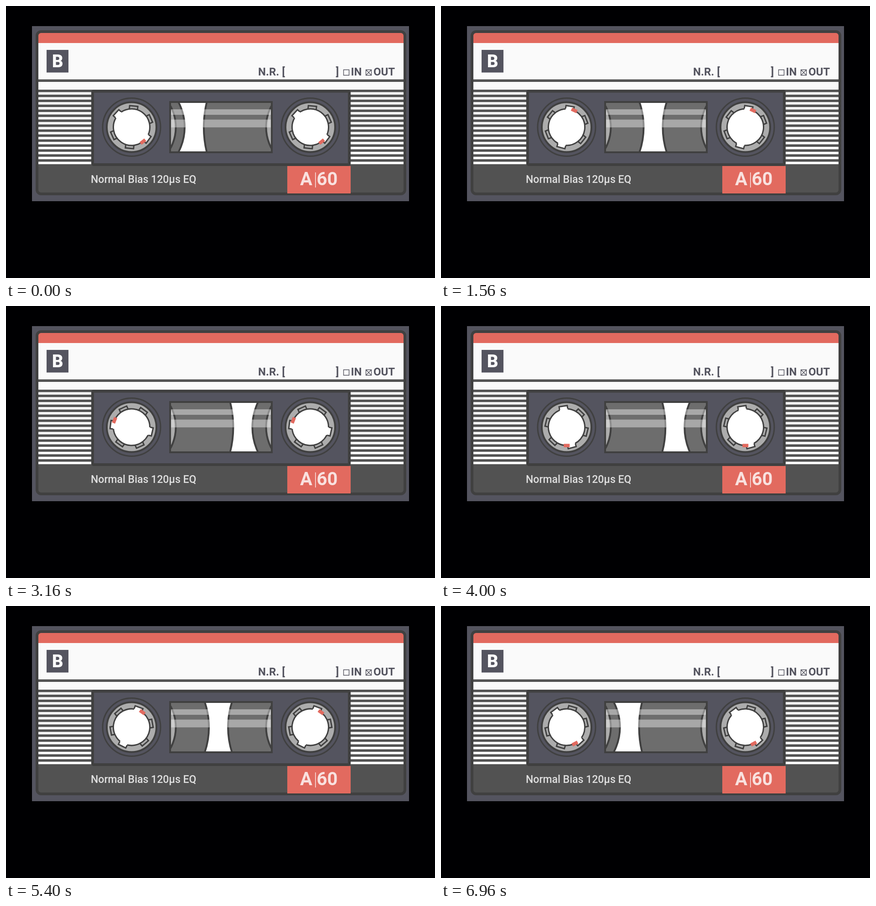
Write an HTML page that moves like this. It is 941x595 px and loops after 7000 ms.

```html
<!DOCTYPE html>
<html lang="en">
<head>
<meta charset="utf-8">
<title>Cassette</title>
<style>
  html, body { margin: 0; width: 100%; height: 100%; overflow: hidden; background: #000002; }
  svg { display: block; }
  text { font-family: Roboto, Arial, sans-serif; font-weight: 700; }
  .edge { stroke: #404040; }
  .slate { fill: #54545f; }
  .red { fill: #e26a5f; }
  .tape { fill: #6d6d6d; stroke-width: 4; }
  .hub { fill: #acacac; stroke-width: 4; }
</style>
</head>
<body>
<svg width="941" height="595" viewBox="0 0 941 595">
  <defs>
    <clipPath id="body"><rect x="68" y="56" width="807" height="355" rx="9"/></clipPath>
    <clipPath id="pane"><rect x="360" y="210" width="223" height="110"/></clipPath>
    <g id="reel">
      <circle r="63.5" fill="none" class="edge" stroke-width="3"/>
      <circle r="54.5" class="hub edge"/>
      <g id="spin">
        <g id="teeth"></g>
        <circle r="40" fill="#fff" class="edge" stroke-width="3"/>
        <g id="gaps"></g>
        <rect class="red" x="36.5" y="-6.5" width="7.5" height="13" transform="rotate(16)"/>
      </g>
    </g>
  </defs>

  <rect class="slate" x="57" y="44" width="827" height="383"/>

  <g clip-path="url(#body)">
    <rect x="65" y="53" width="813" height="361" fill="#525252"/>
    <rect class="red" x="65" y="53" width="813" height="28"/>
    <rect x="65" y="81" width="813" height="79.5" fill="#fafafa"/>
    <rect x="65" y="166" width="813" height="17" fill="#fafafa"/>
    <g id="stripes" fill="#fafafa"></g>
  </g>
  <rect x="68" y="56" width="807" height="355" rx="9" fill="none" class="edge" stroke-width="6"/>

  <rect class="slate" x="89" y="96" width="48" height="49.5"/>
  <text x="113.3" y="134" font-size="38" text-anchor="middle" fill="#fafafa" style="font-weight:900">B</text>
  <g class="slate" font-size="24">
    <text x="553" y="152">N.R. [</text>
    <text x="723.5" y="152">]</text>
    <text x="756.5" y="152">IN</text>
    <text x="806" y="152">OUT</text>
  </g>
  <path d="M740.5 139.5h12v12h-12zM789.5 139.5h12v12h-12zl12 12m0-12l-12 12" fill="none" stroke="#54545f" stroke-width="1.4"/>

  <rect x="190" y="186.5" width="563" height="160.5" rx="2" class="slate edge" stroke-width="6"/>
  <use href="#reel" x="275.5" y="265"/>
  <use href="#reel" x="667.5" y="265"/>

  <g clip-path="url(#pane)">
    <rect x="358" y="208" width="227" height="114" fill="#fff"/>
    <circle id="left" class="tape edge" cx="275.5" cy="265"/>
    <circle id="right" class="tape edge" cx="667.5" cy="265"/>
    <circle class="hub edge" cx="275.5" cy="265" r="97"/>
    <circle class="hub edge" cx="667.5" cy="265" r="97"/>
    <path d="M360 226h223v12h-223zM360 248.5h223v17h-223z" fill="#fff" opacity=".4"/>
  </g>
  <rect x="360" y="210" width="223" height="110" fill="none" class="edge" stroke-width="4"/>

  <text x="186" y="387" font-size="23" fill="#dfdfdf" style="font-weight:500">Normal Bias 120µs EQ</text>
  <rect class="red" x="617" y="350" width="139" height="60"/>
  <g fill="#f9e1df" font-size="40">
    <text x="645" y="392">A</text>
    <text x="681.5" y="392">60</text>
    <rect x="678" y="364" width="1.6" height="33"/>
  </g>
</svg>
<script>
const el = id => document.getElementById(id);
const repeat = (n, f) => Array.from({ length: n }, (_, i) => f(i)).join('');

const PITCH = 10.87;
el('stripes').innerHTML = repeat(15, i =>
  `<rect x="65" y="${183 + PITCH * (i + 0.5)}" width="813" height="${PITCH / 2}"/>`);

// Six teeth; two opposite ones open into the white centre.
el('teeth').innerHTML = [60, 120, 240, 300].map(a =>
  `<rect x="38" y="-9" width="8.5" height="18" transform="rotate(${a})" fill="#acacac" class="edge" stroke-width="3"/>`).join('');
el('gaps').innerHTML = [1, 187].map(a =>
  `<g transform="rotate(${a})"><rect x="35" y="-8.5" width="11" height="17" fill="#fff"/>
   <path d="M40-9H46.5V9H40" fill="none" class="edge" stroke-width="3"/></g>`).join('');

const LOOP = 7000, LEAD = 10, TURNS = 6;

function draw(now) {
  const t = (now + LEAD) % LOOP;
  const p = 1 - Math.abs(1 - 2 * t / LOOP); // forward, then rewind
  el('left').setAttribute('r', 116 + 118 * p);
  el('right').setAttribute('r', 234 - 118 * p);
  el('spin').setAttribute('transform', `rotate(${29 + 360 * TURNS * p})`);
}

const start = performance.now();
function tick() {
  draw(performance.now() - start);
  requestAnimationFrame(tick);
}
tick();
</script>
</body>
</html>
```
